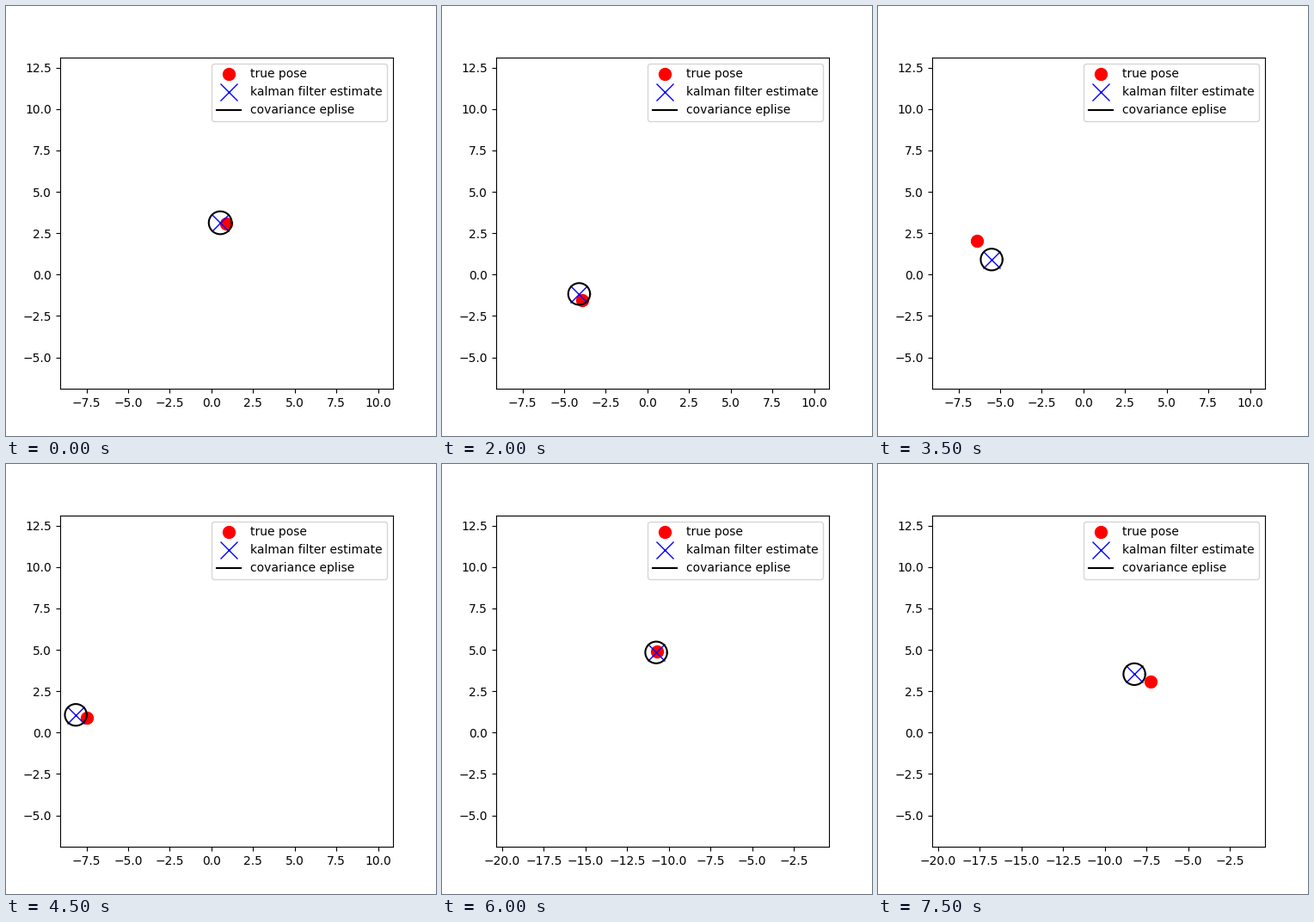
Recreate the animation shown at these times as a matplotlib script. Size 500 by 500 pixels, loop 8000 ms.

```python
import numpy as np
import matplotlib.pyplot as plt
from matplotlib.animation import FuncAnimation

STEP_MS = 500
HALF_SPAN = 10

# Way points of the estimate, one per step, as x + yj
estimate = np.array([
    0.53+3.13j, 1.70+4.94j, -0.97+1.91j, -4.42+1.24j,
    -4.10-1.17j, 0.31-0.72j, -0.67-2.36j, -5.51+0.91j,
    -7.05+3.17j, -8.14+1.07j, -10.55+0.94j, -10.47-0.80j,
    -10.76+4.84j, -10.75+2.94j, -8.04+4.53j, -8.23+3.53j,
])
steps = np.arange(len(estimate))

# The filter's error drifts between a few key values
error_keys = {0: 0.366-0.023j, 2: 0.05, 4: 0.20-0.37j, 7: -0.87+1.13j,
              9: 0.67-0.19j, 10: 0.16, 12: 0.07+0.08j, 15: 0.96-0.47j}
true_pose = estimate + np.interp(steps, list(error_keys),
                                 np.array(list(error_keys.values())))

# The covariance settles right after the first measurement
radius = 0.655 + 0.035 * 0.05 ** steps
ring = np.exp(1j * np.linspace(0, 2 * np.pi, 100))


def view(center):
    return center - HALF_SPAN, center + HALF_SPAN


def view_centers(xs):
    """Recenter the view whenever the pose leaves it."""
    centers = [xs[0]]
    for x in xs[1:]:
        escaped = abs(x - centers[-1]) > HALF_SPAN
        centers.append(x if escaped else centers[-1])
    return centers


centers = view_centers(true_pose.real)

fig, ax = plt.subplots(figsize=(5, 5), dpi=100)
true_dot, = ax.plot([], [], "ro", markersize=10, label="true pose")
est_mark, = ax.plot([], [], "bx", markersize=15,
                    label="kalman filter estimate")
ellipse, = ax.plot([], [], "k-", label="covariance eplise")
ax.legend(loc="upper right")
ax.set_ylim(*view(true_pose[0].imag))


def place(line, points):
    points = np.atleast_1d(points)
    line.set_data(points.real, points.imag)


def update(i):
    place(true_dot, true_pose[i])
    place(est_mark, estimate[i])
    place(ellipse, estimate[i] + radius[i] * ring)
    ax.set_xlim(*view(centers[i]))
    return true_dot, est_mark, ellipse


anim = FuncAnimation(fig, update, frames=len(steps), interval=STEP_MS,
                     repeat=True, repeat_delay=0, blit=False)
plt.show()
```
